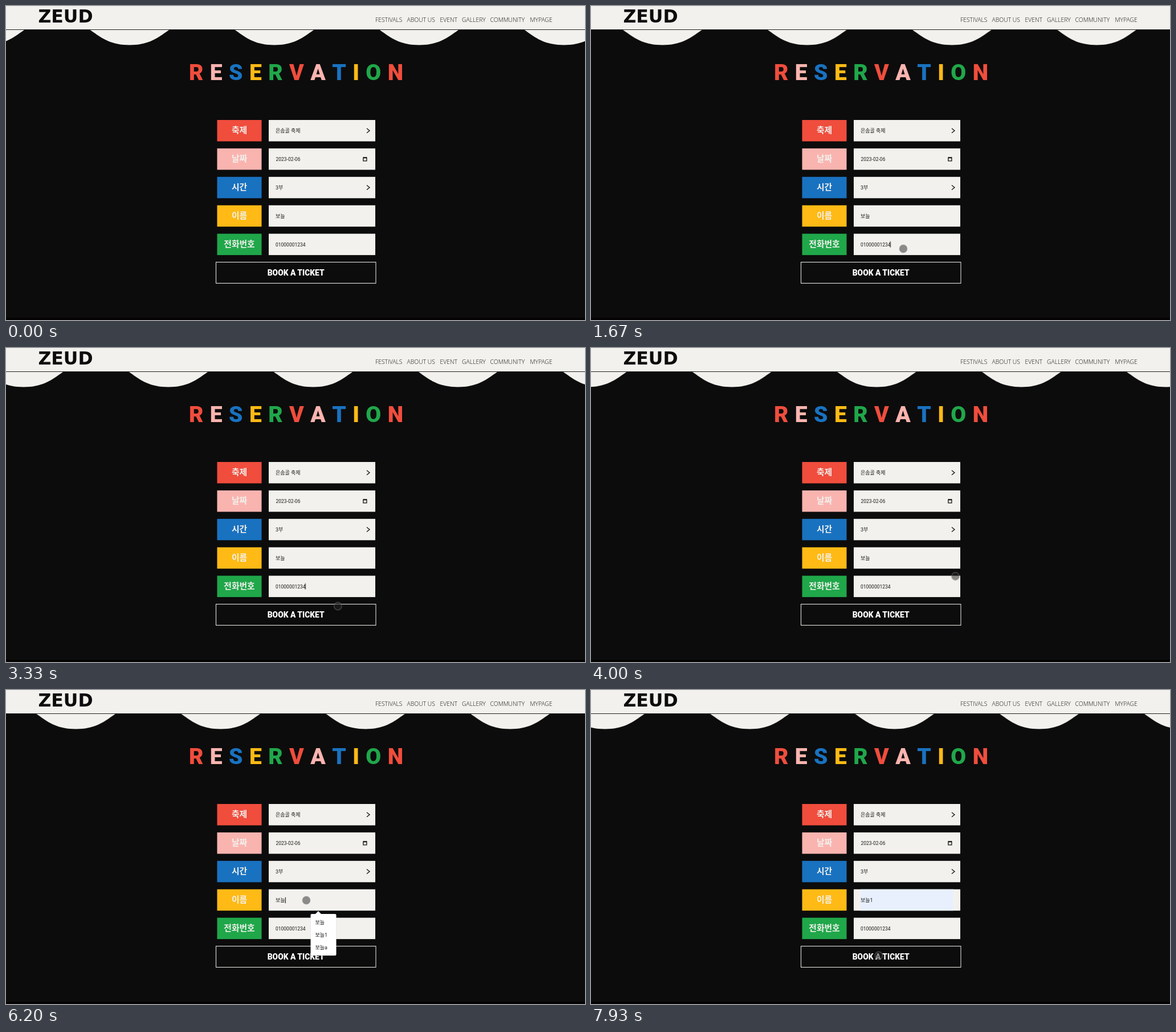
An HTML page that plays this animation: 1016 px wide and 551 px high, repeating every 8000 ms.

```html
<!DOCTYPE html>
<html lang="ko">
<head>
<meta charset="utf-8">
<title>Reservation</title>
<style>
  :root { --paper: #f2f1ed; --ink: #0c0c0c; --red: #f04d3d; --pink: #fab4af; --blue: #1972c0; --yellow: #ffba15; --green: #20a74a; }
  html, body { margin: 0; width: 100%; height: 100%; overflow: hidden; background: var(--ink); }
  svg { display: block; width: 1016px; height: 551px; }
  text { white-space: pre; }
  .paper { fill: var(--paper); }
  .logo { font: bold 31.5px "DejaVu Sans", sans-serif; fill: var(--ink); }
  .nav { font: 300 10.4px "Open Sans", sans-serif; fill: #111; }
  .title { font: 900 39px Roboto, sans-serif; letter-spacing: 11.4px; font-kerning: none; }
  .label { font: bold 14.8px "Noto Sans CJK KR", "Noto Sans CJK", sans-serif; text-anchor: middle; fill: var(--paper); }
  .value { font: 8.5px Roboto, "Noto Sans CJK KR", "Noto Sans CJK", sans-serif; fill: #1c1c1c; }
  .ko { font-size: 9px; }
  .book { font: 900 13.8px Roboto, sans-serif; text-anchor: middle; fill: #fff; }
  .icon { fill: none; stroke: #111; stroke-width: 1.3; }
  .red { fill: var(--red); } .pink { fill: var(--pink); } .blue { fill: var(--blue); }
  .yellow { fill: var(--yellow); } .green { fill: var(--green); }

  #wave { animation: drift 8s steps(119) -4ms infinite; }
  @keyframes drift {
    0% { transform: none; animation-timing-function: steps(1); }
    .8333% { transform: translateX(-1px); }
    100% { transform: translateX(-450.2px); }
  }

  #cursor { animation: move 8s linear infinite; }
  @keyframes move {
    0%, .8% { transform: translate(1030px, 240px); }
    10.8% { transform: translate(700px, 332px); }
    16% { transform: translate(556px, 432px); }
    18.5%, 22.5% { transform: translate(548px, 426px); }
    28%, 33.3% { transform: translate(536px, 414px); }
    40% { transform: translate(566px, 466px); }
    44% { transform: translate(606px, 434px); }
    49%, 51% { transform: translate(639.5px, 400.5px); }
    55% { transform: translate(590px, 385px); }
    61%, 64% { transform: translate(518px, 368px); }
    72%, 79% { transform: translate(527px, 369px); }
    84%, 91% { transform: translate(552px, 432px); }
    96% { transform: translate(507px, 470px); }
    99%, 100% { transform: translate(505px, 466px); }
  }

  .timed { visibility: hidden; animation: 8s step-end infinite; }
  #phoneFocus { animation-name: phoneFocus; }
  #phoneFocus rect { animation: blink 1s step-end -670ms infinite; }
  #nameCaret { animation-name: nameCaret; }
  #endCaret { animation-name: endCaret; }
  #popup { animation-name: popup; }
  #hover { animation-name: hover; }
  #oldName { visibility: visible; animation-name: oldName; }
  #newName { animation-name: newName; }
  @keyframes blink { 0% { opacity: 1; } 50% { opacity: 0; } }
  @keyframes phoneFocus { 16.6% { visibility: visible; } 72.5% { visibility: hidden; } }
  @keyframes nameCaret { 72.5% { visibility: visible; } 78.75% { visibility: hidden; } }
  @keyframes endCaret { 90.9% { visibility: visible; } 97.1% { visibility: hidden; } }
  @keyframes popup { 72.5% { visibility: visible; } 90.9% { visibility: hidden; } }
  @keyframes hover { 83.3% { visibility: visible; } 90.9% { visibility: hidden; } }
  @keyframes oldName { 83.3%, 100% { visibility: hidden; } }
  @keyframes newName { 83.3%, 100% { visibility: visible; } }
</style>
</head>
<body>
<svg viewBox="0 0 1016 551">
  <rect width="1016" height="551" fill="#0c0c0c"/>
  <rect y="547" width="1016" height="4" fill="#050304"/>

  <path id="wave" class="paper"/>
  <rect class="paper" width="1016" height="42"/>
  <rect y="41" width="1016" height="1" fill="#222"/>

  <text class="logo" x="56.5" y="28.5">ZEUD</text>
  <g class="nav">
    <text x="648" y="28">FESTIVALS</text>
    <text x="703.5" y="28">ABOUT US</text>
    <text x="761.5" y="28">EVENT</text>
    <text x="800" y="28">GALLERY</text>
    <text x="849.5" y="28">COMMUNITY</text>
    <text x="919.5" y="28">MYPAGE</text>
  </g>

  <text class="title" x="321" y="129.5"><tspan class="red">R</tspan><tspan class="pink">E</tspan><tspan class="blue">S</tspan><tspan class="yellow">E</tspan><tspan class="green">R</tspan><tspan class="red">V</tspan><tspan class="pink">A</tspan><tspan class="blue">T</tspan><tspan class="yellow">I</tspan><tspan class="green">O</tspan><tspan class="red">N</tspan></text>

  <g transform="translate(370.5 200)">
    <rect class="red" width="78" height="37.5"/>
    <rect class="paper" x="90.5" width="187" height="37.5"/>
    <text class="label" x="39" y="23">축제</text>
    <text class="value ko" x="102.5" y="22.3">은솜골 축제</text>
    <path class="icon" d="M262.5 14.8l5 4-5 4"/>
  </g>
  <g transform="translate(370.5 249.9)">
    <rect class="pink" width="78" height="37.5"/>
    <rect class="paper" x="90.5" width="187" height="37.5"/>
    <text class="label" x="39" y="23">날짜</text>
    <text class="value" x="103" y="22">2023-02-06</text>
    <path class="icon" stroke-width="1" d="M256.4 16.6h6v5.4h-6zM256 16h7M257.6 14.8v1M261.4 14.8v1"/>
  </g>
  <g transform="translate(370.5 299.8)">
    <rect class="blue" width="78" height="37.5"/>
    <rect class="paper" x="90.5" width="187" height="37.5"/>
    <text class="label" x="39" y="23">시간</text>
    <text class="value ko" x="102.5" y="22.3">3부</text>
    <path class="icon" d="M262.5 14.8l5 4-5 4"/>
  </g>
  <g transform="translate(370.5 349.7)">
    <rect class="yellow" width="78" height="37.5"/>
    <rect class="paper" x="90.5" width="187" height="37.5"/>
    <text class="label" x="39" y="23">이름</text>
    <text id="oldName" class="value ko timed" x="102.5" y="22.3">보늘</text>
    <g id="newName" class="timed">
      <rect x="102.5" width="163" height="37.5" fill="#e8f0fe"/>
      <text class="value ko" x="102.5" y="22.3">보늘1</text>
    </g>
    <rect id="nameCaret" class="timed" x="119.3" y="14" width="1" height="10.5"/>
    <rect id="endCaret" class="timed" x="124.5" y="14" width="1" height="10.5"/>
  </g>
  <g transform="translate(370.5 399.6)">
    <rect class="green" width="78" height="37.5"/>
    <rect class="paper" x="90.5" width="187" height="37.5"/>
    <text class="label" x="39" y="23">전화번호</text>
    <text class="value" x="102.5" y="22">01000001234</text>
    <g id="phoneFocus" class="timed"><rect x="154.3" y="13.5" width="1" height="10.5"/></g>
  </g>

  <rect x="368.5" y="449.5" width="280.5" height="37" fill="none" stroke="#f2f1ed"/>
  <text class="book" x="508.7" y="473">BOOK A TICKET</text>

  <g id="popup" class="timed">
    <rect x="534" y="393" width="46" height="74.5" rx="3" fill="#000" opacity=".12"/>
    <path fill="#fff" d="M542.5 393.5l5.5-5.5 5.5 5.5z"/>
    <rect x="534.5" y="393" width="45" height="73" rx="2" fill="#fff"/>
    <rect id="hover" class="timed" x="534.5" y="418" width="45" height="23" fill="#e8e8e9"/>
    <g class="value">
      <text class="ko" x="542.5" y="410.5">보늘</text>
      <text class="ko" x="542.5" y="432.8">보늘1</text>
      <text class="ko" x="542.5" y="455">보늘a</text>
    </g>
  </g>

  <circle id="cursor" r="6.7" fill="#232323" fill-opacity=".5" stroke="#808080" stroke-opacity=".5" stroke-width="1.4"/>
</svg>
<script>
  // Seven identical swells; their crests stay hidden behind the header.
  const swell = 's63.5 45 127 45s63.5-45 127-45';
  document.getElementById('wave').setAttribute('d', 'M-164 23.5' + swell.repeat(7) + 'z');
</script>
</body>
</html>
```
